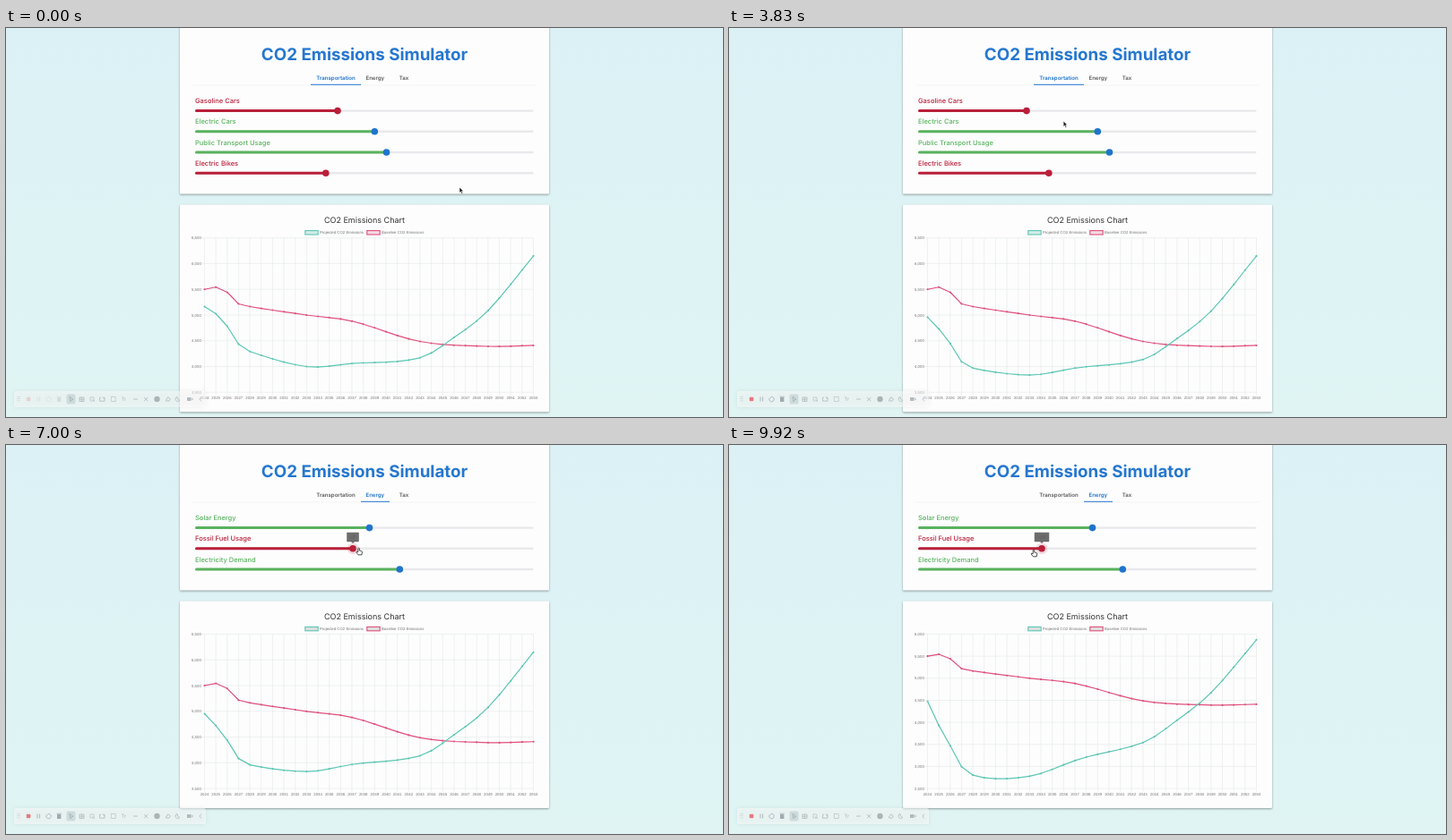
These frames come from a looping animation (800 by 435 pixels, 10 s). An HTML page:

```html
<!DOCTYPE html>
<html lang="en">
<head>
<meta charset="utf-8">
<title>CO2 Emissions Simulator</title>
<style>
html, body { margin: 0; width: 100%; height: 100%; overflow: hidden; background: linear-gradient(#dcf1f5, #dff4f3); }
svg { display: block; width: 100%; height: 100%; text-rendering: geometricPrecision; }
.ui { font-family: Inter, "Open Sans", sans-serif; }
.chart text { font: 4.3px "Liberation Sans", Arial, sans-serif; fill: #747474; }
.chart text.head { font: 400 9px Inter, sans-serif; fill: #333; }
.card { fill: #fdfdfe; filter: drop-shadow(0 1px .8px rgba(0,0,0,.36)); }
.title { font-size: 18.75px; font-weight: 700; fill: #2577cf; }
.tab { font-size: 6.1px; font-weight: 600; fill: #5a5a5a; }
.tab.on { fill: #1f74cc; }
.label { font-size: 7.5px; font-weight: 500; }
.line { fill: none; stroke-width: 1.2; stroke-linejoin: round; }
.dots { fill: none; stroke-width: 2.1; stroke-linecap: round; }
.tool { fill: none; stroke: #8d9a9e; stroke-width: .9; }
</style>
</head>
<body>
<svg id="stage" viewBox="0 0 800 435">
  <rect id="panel" class="card" x="194" y="-4" width="412" rx="1.2"/>
  <g class="ui" text-anchor="middle">
    <text class="title" x="400" y="36.2">CO2 Emissions Simulator</text>
    <text class="tab" x="368" y="57.6">Transportation</text>
    <text class="tab" x="411.8" y="57.6">Energy</text>
    <text class="tab" x="444" y="57.6">Tax</text>
  </g>
  <path d="M208 64H592" stroke="#ececed" stroke-width=".6"/>
  <rect id="ink" y="62.8" height="1" fill="#2577cf"/>
  <g id="transport" class="ui"></g>
  <g id="energy" class="ui"></g>

  <g id="chart" class="chart">
    <rect class="card" x="194" y="197.6" width="412" height="231.6" rx="1.2"/>
    <text class="head" x="400" y="217.8" text-anchor="middle">CO2 Emissions Chart</text>
    <rect class="key" x="333.8" y="226.6" width="14.4" height="4.4" stroke="#5cc6b3" stroke-width="1.1"/>
    <text x="350" y="230.4">Projected CO2 Emissions</text>
    <rect class="key" x="402.8" y="226.6" width="14.4" height="4.4" stroke="#df4f7b" stroke-width="1.1"/>
    <text x="419" y="230.4">Baseline CO2 Emissions</text>
    <path id="grid" fill="none" stroke="#e3eae5" stroke-width=".6"/>
    <g id="years" text-anchor="middle"></g>
    <g id="ticks" text-anchor="end"></g>
    <g stroke="#df4f7b"><path id="baseLine" class="line"/><path id="baseDots" class="dots"/></g>
    <g stroke="#5cc6b3"><path id="projLine" class="line"/><path id="projDots" class="dots"/></g>
  </g>

  <g id="bar">
    <rect x="9" y="406" width="214" height="18" rx="2.5" fill="#fff" fill-opacity=".5" style="filter:drop-shadow(0 0 2px rgba(0,0,0,.13))"/>
    <rect x="67.5" y="409.5" width="10" height="11" rx="2" fill="#aebfc4" fill-opacity=".45"/>
    <g id="recorder">
      <rect x="22.8" y="412.7" width="4.6" height="4.6" rx="1" fill="#e2525c"/>
      <path class="tool" stroke-width="1.3" d="M35 412.5v5M37.6 412.5v5"/>
      <path class="tool" d="M45.3 413.6a2.7 2.7 0 1 0 2.4-1.2l-1.6 1.2"/>
      <path d="M57 413h4.4v5H57zM56.5 411.8h5.4v.8h-5.4z" fill="#87949a"/>
    </g>
    <g opacity=".58">
      <path class="tool" stroke-dasharray=".8 1.4" d="M13 412v6M15 412v6"/>
      <path class="tool" d="M71 412.2l4 3.2-2 .4-1 2zM106 413.2h-1.4v4h5.4v-4h-1M142 415h5M218 412.6l-2.2 2.4 2.2 2.4"/>
      <path class="tool" d="M94 413h4v4h-4zM96.5 415.5l2.5 2.2M117.3 412.5h5v5h-5z" stroke-dasharray="1.5 .6"/>
      <path class="tool" d="M82 413h5v4.5h-5zM84.5 413v4.5M82 415.2h5M108 412.5l1.8 2.6"/>
      <path class="tool" stroke-width="1.3" d="M154 413l4.4 4.2M158.4 413l-4.4 4.2"/>
      <circle cx="168.5" cy="415" r="3.2" fill="#7e8a8e"/>
      <path class="tool" d="M178.2 416.8l2.4-4 2.8 2-1.4 2.4zM191 412.5a2.6 2.6 0 1 0 2.8 4q-3-.8-2.8-4"/>
      <path d="M202 413h4.6v4H202zM206.8 415l1.8-1.6v3.2z" fill="#87949a"/>
      <text class="ui" x="128.6" y="417.2" font-size="5.8" fill="#7e8a8e">Tr</text>
    </g>
  </g>

  <g id="cursor">
    <path id="arrow" d="M0 0V6.2L1.4 5 2.5 7.5 3.6 7 2.5 4.6H4.4Z" fill="#1c1c1c" stroke="#fff" stroke-width=".5"/>
    <path id="hand" d="M-.8.6Q0-.6.8.6V3L3 3.5Q4 3.8 3.8 4.8L3.2 7.8H-.6L-2.8 5Q-3 3.9-1.9 4.2L-.8 4.8Z" fill="#fff" stroke="#222" stroke-width=".8"/>
  </g>
</svg>
<script>
const FRAMES = 120, STEP = 1000 / 12;
const TAB_AT = 68 * STEP, RESCALE_AT = 8478;
const RED = '#b91f39', GREEN = '#59b25e', BLUE = '#1f74cc';
const LEFT = 211, TRACK = 377.5, X0 = 221.5, DX = 12.655, TOP = 234.7, H = 172.6;
const YEARS = 30;

const $ = id => document.getElementById(id);
const set = (node, attrs) => { for (const k in attrs) node.setAttribute(k, attrs[k]); return node; };
const add = (parent, tag, attrs, text) => {
  const node = set(document.createElementNS('http://www.w3.org/2000/svg', tag), attrs);
  if (text !== undefined) node.textContent = text;
  return parent.appendChild(node);
};
const show = (node, on) => { node.style.display = on ? '' : 'none'; };
const clamp = v => Math.min(1, Math.max(0, v));
const mix = (a, b, k) => a + (b - a) * k;
const easeOut = k => 1 - (1 - clamp(k)) ** 4;

// Index of the segment of sorted rows that holds x
const segment = (rows, x) => {
  let i = 0;
  while (i < rows.length - 2 && x >= rows[i + 1][0]) i++;
  return i;
};

// Linear interpolation along rows of [time, value, ...]
function along(rows, t) {
  const i = segment(rows, t), a = rows[i], b = rows[i + 1];
  const k = clamp((t - a[0]) / (b[0] - a[0]));
  return a.slice(1).map((v, j) => mix(v, b[j + 1], k));
}

// Yearly values of a smooth cubic curve through a few [year, value] points
function curve(...pts) {
  const slope = i => {
    const a = pts[Math.max(0, i - 1)], b = pts[Math.min(pts.length - 1, i + 1)];
    return (b[1] - a[1]) / (b[0] - a[0]);
  };
  return Array.from({ length: YEARS }, (_, x) => {
    const i = segment(pts, x), [xa, ya] = pts[i], [xb, yb] = pts[i + 1];
    const h = xb - xa, k = (x - xa) / h, r = 1 - k;
    return mix(ya, yb, k * k * (3 - 2 * k)) + h * k * r * (r * slope(i) - k * slope(i + 1));
  });
}

const baseline = curve([0, 5500], [1, 5543], [2, 5443], [3, 5218], [4, 5165], [9, 5000], [13, 4882], [19, 4487], [25, 4392], [29, 4410]);
const projected = curve([0, 5165], [1, 5026], [2, 4783], [3, 4435], [4, 4291], [9, 4000], [13, 4058], [19, 4169], [22, 4565], [25, 5087], [29, 6150]);
// Drop in emissions at the lowest setting of each dragged slider
const gasCut = curve([0, 212], [1, 304], [3, 353], [9, 170], [15, 64], [22, 21], [29, 1]);
const fossilCut = curve([0, 476], [1, 793], [3, 1089], [5, 1174], [9, 1052], [15, 737], [29, 277]);

const gasKeys = [[2416, 370], [3380, 332]];
const fossilKeys = [[8470, 387], [RESCALE_AT, 361], [8600, 361], [8916, 349]];
const pathKeys = [[250, 506, 178], [1416, 383, 120.5], [1750, 371, 96], [2416, 370, 92], [3380, 332, 92],
  [4250, 411, 115], [4450, 411, 115], [4666, 419.5, 122.5], [5500, 412, 55], [5750, 412, 55],
  [6900, 394, 115], [8470, 388, 116], [8500, 361, 116], [9910, 340, 117]];
const handTimes = [[2050, 3600], [4160, 4600], [5250, 5950], [6580, 10000]];

function slider(parent, row, name, color, x, hover) {
  const y = 92.6 + row * 23.2, thumb = color === RED ? RED : BLUE;
  add(parent, 'text', { class: 'label', x: LEFT, y: y - 8.4, fill: color }, name);
  add(parent, 'rect', { x: LEFT, y: y - 1.2, width: TRACK, height: 2.4, rx: 1.2, fill: '#e9e9ec' });
  const fill = add(parent, 'rect', { x: LEFT, y: y - 1.5, height: 3, rx: 1.5, fill: color });
  const knob = add(parent, 'g', {});
  const halo = add(knob, 'circle', { r: 6.4, fill: thumb, 'fill-opacity': .15 });
  add(knob, 'circle', { r: 3.8, fill: thumb });
  const tip = add(knob, 'g', {});
  const box = add(tip, 'rect', { y: -10.8, height: 10.4, rx: .8, fill: '#6d6d6d' });
  add(tip, 'path', { d: 'M-2-.6H2L0 1.4Z', fill: '#6d6d6d' });
  const value = add(tip, 'text', { y: -3.6, 'font-size': 5, fill: '#565656', 'text-anchor': 'middle' });
  return t => {
    const at = typeof x === 'number' ? x : along(x, t)[0];
    set(fill, { width: at - LEFT });
    set(knob, { transform: `translate(${at} ${y})` });
    const size = hover ? Math.min(clamp((t - hover[0]) / 150), 1 - clamp((t - hover[1]) / 150)) : 0;
    show(halo, size > 0);
    show(tip, size > 0);
    if (!size) return;
    const label = String(Math.round((at - LEFT) / TRACK * 200 - 100));
    const w = 7.8 + 2.9 * label.length;
    value.textContent = label;
    set(box, { x: -w / 2, width: w });
    set(tip, { transform: `translate(0 -7.2) scale(${size})` });
  };
}

const sliders = [
  slider($('transport'), 0, 'Gasoline Cars', RED, gasKeys, [2200, 3600]),
  slider($('transport'), 1, 'Electric Cars', GREEN, 411.3, [4200, 4540]),
  slider($('transport'), 2, 'Public Transport Usage', GREEN, 424.5),
  slider($('transport'), 3, 'Electric Bikes', RED, 356.8),
  slider($('energy'), 0, 'Solar Energy', GREEN, 405.5),
  slider($('energy'), 1, 'Fossil Fuel Usage', RED, fossilKeys, [6600, 10500]),
  slider($('energy'), 2, 'Electricity Demand', GREEN, 439.3)
];

const axisAt = t => t < RESCALE_AT ? [3500, 6500] : [2500, 6000];
const toY = (v, [lo, hi]) => TOP + (hi - v) / (hi - lo) * H;

function targets(t) {
  const axis = axisAt(t);
  const gas = (370 - along(gasKeys, t)[0]) / 38, fossil = (387 - along(fossilKeys, t)[0]) / 38;
  return [
    baseline.map(v => toY(v, axis)),
    projected.map((v, i) => toY(v - gas * gasCut[i] - fossil * fossilCut[i], axis))
  ];
}

// Every slider update restarts a one second ease from the current pose
const updates = [];
for (let f = 30; f <= 41; f++) updates.push(f * STEP);
updates.push(RESCALE_AT);
for (let f = 104; f <= 107; f++) updates.push(f * STEP);
const goals = updates.map(targets), start = targets(0);

function pose(t) {
  let now = start;
  updates.forEach((at, n) => {
    if (t < at) return;
    const end = n + 1 < updates.length ? Math.min(t, updates[n + 1]) : t;
    const k = easeOut((end - at) / 1000);
    now = now.map((ys, s) => ys.map((y, i) => mix(y, goals[n][s][i], k)));
  });
  return now;
}

function plot(name, ys) {
  const pts = ys.map((y, i) => `${(X0 + i * DX).toFixed(2)} ${y.toFixed(2)}`);
  set($(name + 'Line'), { d: 'M' + pts.join('L') });
  set($(name + 'Dots'), { d: pts.map(p => `M${p}h.01`).join('') });
}

let columns = '';
for (let i = 0; i < YEARS; i++) {
  const x = X0 + i * DX;
  columns += `M${x} ${TOP}V${TOP + H + 3.5}`;
  add($('years'), 'text', { x, y: 415.4 }, 2024 + i);
}

let axisShown = 0;
function drawAxis([lo, hi]) {
  if (axisShown === hi) return;
  axisShown = hi;
  $('ticks').textContent = '';
  let rows = '';
  for (let v = lo; v <= hi; v += 500) {
    const y = toY(v, [lo, hi]);
    rows += `M${X0 - 3.5} ${y}H${X0 + (YEARS - 1) * DX}`;
    add($('ticks'), 'text', { x: 217.8, y: y + 1.5 }, v.toLocaleString('en-US'));
  }
  set($('grid'), { d: columns + rows });
}

const tabs = document.querySelectorAll('.tab'), keys = document.querySelectorAll('.key');

function draw(time) {
  const t = Math.floor(time / STEP + .06) % FRAMES * STEP + .01;
  const energy = t >= TAB_AT;
  show($('transport'), !energy);
  show($('energy'), energy);
  tabs[0].classList.toggle('on', !energy);
  tabs[1].classList.toggle('on', energy);
  const slide = 1 - (1 - clamp((t - TAB_AT) / 300)) ** 3;
  set($('ink'), { x: mix(340, 396, slide), width: mix(56, 32, slide) });
  set($('panel'), { height: energy ? 166.4 : 189.6 });
  set($('chart'), { transform: `translate(0 ${energy ? -23.2 : 0})` });
  keys.forEach((key, i) => set(key, { fill: energy ? '#dcdfdf' : ['#d3ece8', '#f6dbe4'][i] }));

  sliders.forEach(update => update(t));
  drawAxis(axisAt(t));
  const [base, proj] = pose(t);
  plot('base', base);
  plot('proj', proj);

  set($('recorder'), { opacity: t < 250 ? .2 : .75 });
  const [x, y] = along(pathKeys, t);
  set($('cursor'), { transform: `translate(${x} ${y})` });
  const hand = handTimes.some(([a, b]) => t >= a && t < b);
  show($('hand'), hand);
  show($('arrow'), !hand);
}

const begin = performance.now();
function tick() {
  draw(performance.now() - begin);
  requestAnimationFrame(tick);
}
tick();
</script>
</body>
</html>
```
